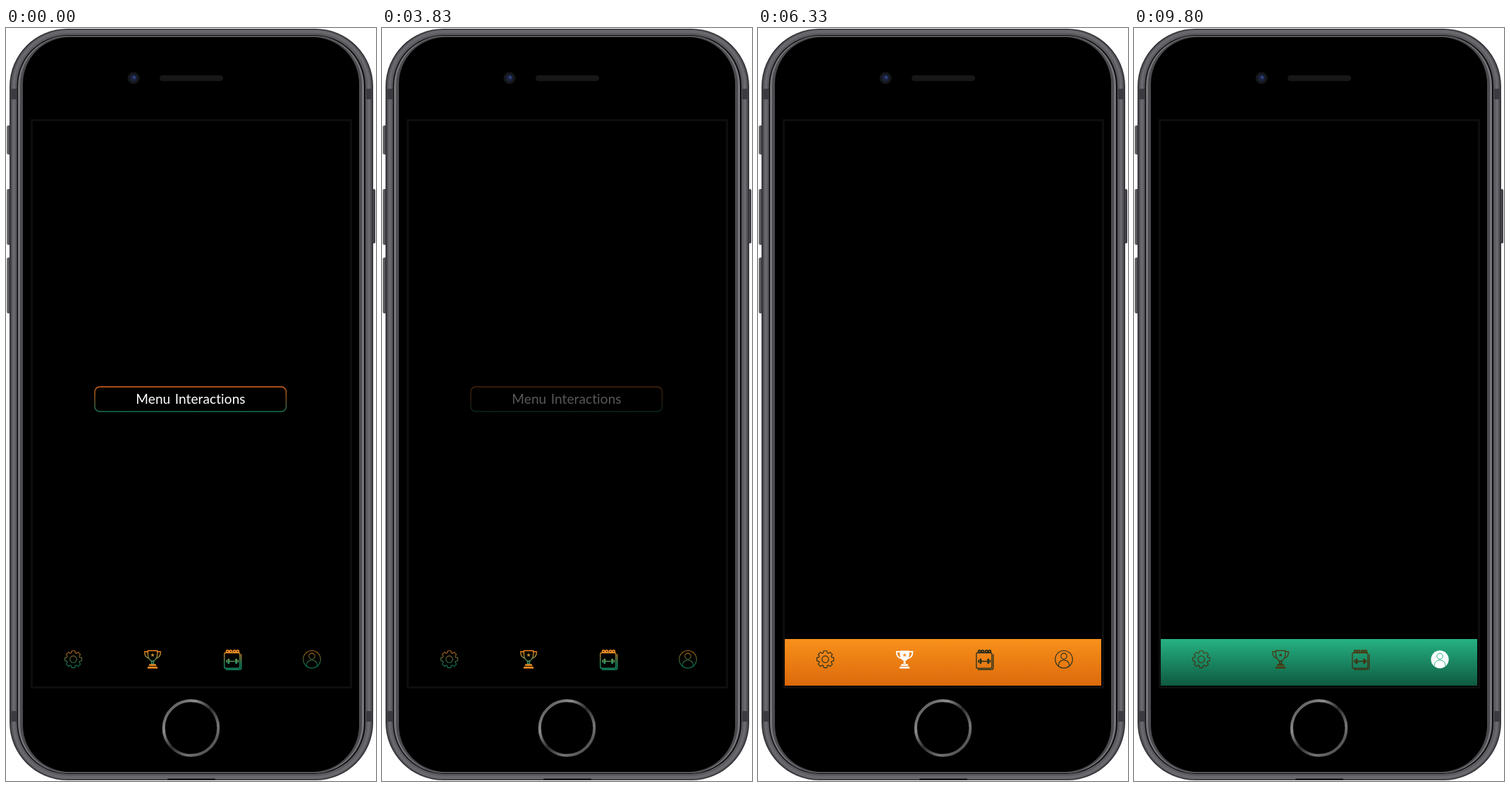
Write an HTML page that moves like this. It is 525 px wide and 1066 px high and loops after 9.83 s.

```html
<!DOCTYPE html>
<html lang="en">
<head>
<meta charset="utf-8">
<title>Menu Interactions</title>
<style>
  html, body { margin: 0; width: 100%; height: 100%; overflow: hidden; background: #fff; }
  svg { display: block; width: 100vw; height: 100vh; }
  text { font: 19px Lato, "Open Sans", sans-serif; letter-spacing: .1px; word-spacing: 1.5px; }
</style>
</head>
<body>
<svg viewBox="0 0 525 1066" xmlns="http://www.w3.org/2000/svg">
  <defs>
    <linearGradient id="button"><stop stop-color="#77777c"/><stop offset="1" stop-color="#2b2b31"/></linearGradient>
    <linearGradient id="home" x1="0" y1="0" x2="1" y2="1">
      <stop stop-color="#3c3c3c"/><stop offset=".28" stop-color="#8d8d8d"/><stop offset=".5" stop-color="#2a2a2a"/>
      <stop offset=".72" stop-color="#757575"/><stop offset="1" stop-color="#333"/>
    </linearGradient>
    <linearGradient id="edge" x1="0" y1="0" x2="0" y2="1">
      <stop stop-color="#dc641c"/><stop offset=".5" stop-color="#7a5527"/><stop offset="1" stop-color="#14714f"/>
    </linearGradient>
    <linearGradient id="bar" gradientUnits="userSpaceOnUse" x1="0" y1="865" x2="0" y2="931"><stop/><stop offset="1"/></linearGradient>
    <linearGradient id="wave" gradientUnits="userSpaceOnUse" x1="0" y1="865" x2="0" y2="931"><stop/><stop offset="1"/></linearGradient>
    <linearGradient id="ink" gradientUnits="userSpaceOnUse" x1="0" y1="881" x2="0" y2="907">
      <stop offset=".1"/><stop offset=".75"/>
    </linearGradient>
    <clipPath id="tray"><rect x="38" y="865" width="449" height="66"/></clipPath>
  </defs>
  <g id="phone"></g>
  <rect x="36.5" y="130.5" width="453" height="803" fill="none" stroke="#0e0e0e" stroke-width="3"/>
  <g id="title">
    <rect x="126" y="508" width="271.5" height="35" rx="7" fill="none" stroke="url(#edge)" stroke-width="1.5"/>
    <text x="262" y="531.5" text-anchor="middle" fill="#fff">Menu Interactions</text>
  </g>
  <g clip-path="url(#tray)">
    <rect id="fill" x="38" y="865" width="449" height="66" fill="url(#bar)"/>
    <path id="ripple" fill="url(#wave)"/>
  </g>
  <g id="icons"></g>
  <circle id="dot" r="24.5" fill="#808080" stroke="#8c8c8c" stroke-width=".7"/>
</svg>
<script>
const LOOP = 9830;
const $ = id => document.getElementById(id);
const clamp = v => Math.max(0, Math.min(1, v));
const span = (t, a, b) => clamp((t - a) / (b - a));
const mix = (a, b, p) => a + (b - a) * p;
const easeOut = p => 1 - (1 - p) ** 2;
const easeInOut = p => p < .5 ? 4 * p ** 3 : 1 - (2 - 2 * p) ** 3 / 2;
const rgb = hex => [1, 3, 5].map(i => parseInt(hex.substr(i, 2), 16));
const blend = (a, b, p) => {
  const to = rgb(b);
  return `rgb(${rgb(a).map((v, i) => Math.round(mix(v, to[i], p)))})`;
};
const set = (el, attrs) => { for (const k in attrs) el.setAttribute(k, attrs[k]); };
const paint = (id, colors) => [...$(id).children].forEach((s, i) => s.setAttribute('stop-color', colors[i]));
const rect = (x, y, w, h, rx, fill) =>
  `<rect x="${x}" y="${y}" width="${w}" height="${h}" rx="${rx}" fill="${fill}"/>`;
const circle = (x, y, r, extra = '') => `<circle cx="${x}" cy="${y}" r="${r}" ${extra}/>`;
const path = (d, extra = '') => `<path d="${d}" ${extra}/>`;

function drawPhone() {
  const bands = [86, 967].map(y => rect(5, y, 10, 15, 0, '#3b3b41') + rect(511, y, 10, 15, 0, '#3b3b41')).join('');
  const keys = [[1, 138, 41], [1, 228, 79], [1, 325, 79], [518, 228, 77]]
    .map(([x, y, h]) => rect(x, y, 6, h, 2, 'url(#button)')).join('');
  $('phone').innerHTML = keys +
    rect(5, 1, 516, 1064, 82, '#2f2f33') +
    rect(6.5, 2, 513, 1062, 81, '#505055') +
    rect(9, 3, 508, 1060, 79, '#68686d') +
    rect(13, 7, 500, 1052, 75, '#5a5a5f') + bands +
    rect(15.5, 10, 494.5, 1046, 72, '#0b0b0c') +
    rect(17, 11, 491, 1044, 71, '#77777b') +
    rect(20, 11.5, 485, 1043, 69, '#4b4b4f') +
    rect(24, 13, 477, 1040, 66, '#000') +
    rect(229, 1062.5, 68, 2.5, 1, '#17171a') +
    rect(218, 67, 90, 8, 4, '#171717') +
    circle(181, 71, 8.5, 'fill="#15161a"') + circle(181, 71, 5, 'fill="#1a2340"') +
    circle(182, 70, 2, 'fill="#2f4783"') +
    circle(262.5, 991, 38.8, 'fill="#000" stroke="url(#home)" stroke-width="4"');
}

// A cog outline with eight teeth.
function cog(cx, cy) {
  const points = [];
  for (let i = 0; i < 8; i++) {
    [[-.31, 9.4], [-.19, 12.2], [.19, 12.2], [.31, 9.4]].forEach(([d, r]) => {
      const a = i * Math.PI / 4 + d;
      points.push(`${(cx + r * Math.cos(a)).toFixed(2)} ${(cy + r * Math.sin(a)).toFixed(2)}`);
    });
  }
  return `M${points.join('L')}Z`;
}

function star(cx, cy, r) {
  const points = Array.from({ length: 10 }, (_, i) => {
    const a = i * Math.PI / 5 - Math.PI / 2, k = i % 2 ? r * .42 : r;
    return `${(cx + k * Math.cos(a)).toFixed(2)} ${(cy + k * Math.sin(a)).toFixed(2)}`;
  });
  return `M${points.join('L')}Z`;
}

const INK = 'stroke="url(#ink)" fill="none"';
const CUP = 'M201.3 881.5H214.7V886C214.7 892 211.5 895.5 208 896.5C204.5 895.5 201.3 892 201.3 886Z';
const HANDLES = 'M201.3 883H196.7C196.5 888 199 891.5 203.5 892.3M214.7 883H219.3C219.5 888 217 891.5 212.5 892.3';
const STEM = 'M206.5 896.5H209.5V900H206.5Z';
const BASE = 'M203.5 900.5H212.5L213.5 903H202.5ZM201.5 904H214.5L215.5 906.7H200.5Z';
const SHOULDERS = 'M426.3 903.2C426 897.5 429.5 895 434 895S442 897.5 441.7 903.2';
const GEAR = cog(95.5, 893.7);
const dumbbell = color =>
  `<g fill="${color}">${rect(317, 895.8, 8.5, 1.5, 0, color)}${rect(314.5, 892.8, 2.7, 7.5, 1, color)}` +
  `${rect(325.3, 892.8, 2.7, 7.5, 1, color)}${rect(312.3, 894.5, 1.7, 4, .7, color)}${rect(328.5, 894.5, 1.7, 4, .7, color)}</g>`;
const rings = [314.3, 318.7, 324.2, 328.6].map(x => circle(x, 882.6, 1.7)).join('');

const ICONS = [
  { x: 95.5,
    line: `<g ${INK} stroke-width="1.15" stroke-linejoin="round">${path(GEAR)}${circle(95.5, 893.7, 4.8)}</g>`,
    solid: path(GEAR, 'fill="#fff"') + circle(95.5, 893.7, 4.8, 'class="cut"') },
  { x: 208,
    line: `<g ${INK} stroke-width="1.3">${path(CUP)}${path(HANDLES)}${path(STEM)}</g>` +
      path(star(208, 887.8, 3.1), 'fill="url(#ink)"') + path(BASE, 'class="base"'),
    solid: `<g fill="#fff">${path(CUP)}${path(STEM)}${path(BASE)}</g>` +
      path(HANDLES, 'fill="none" stroke="#fff" stroke-width="1.8"') + path(star(208, 887.8, 3.1), 'class="cut"') },
  { x: 321,
    line: `<g ${INK} stroke-width="1.3"><rect x="309.8" y="884.5" width="22" height="22" rx="2"/>` +
      `${path('M333.8 886.5V906Q333.8 908.4 331.4 908.4H312')}<g stroke-width="1.9">${rings}</g></g>` +
      dumbbell('url(#ink)'),
    solid: rect(309.5, 884, 24, 24.5, 2, '#fff') +
      `<g fill="#fff" stroke="#4d6a5e" stroke-width=".9">${rings}</g>` +
      `<g opacity=".7">${dumbbell('#6d6d6d')}</g>` },
  { x: 434,
    line: `<g ${INK} stroke-width="1.15">${circle(434, 893.8, 12.3)}${circle(434, 889.3, 4.2)}${path(SHOULDERS)}</g>`,
    solid: circle(434, 893.8, 12.6, 'fill="#fff"') +
      `<g class="trace" fill="none" stroke-width="1">${circle(434, 889.3, 4.2)}${path(SHOULDERS)}</g>` }
];

// Each state: start and end of its reveal, bar colours, icon line colours.
const STATES = [
  { start: 0, end: 1, bar: ['#000000', '#000000'], ink: ['#ef8a20', '#189a70'] },
  { start: 3950, end: 4700, bar: ['#be3b10', '#b0350d'], ink: ['#201a14', '#201a14'] },
  { start: 5200, end: 5950, bar: ['#f8911b', '#dc690b'], ink: ['#2b2b1c', '#1f3022'] },
  { start: 6450, end: 7200, bar: ['#2dc492', '#27b07f'], ink: ['#4c2b12', '#2c2a14'] },
  { start: 7750, end: 8500, bar: ['#26b282', '#0e5a41'], ink: ['#4a3a14', '#3f2c10'] }
];

drawPhone();
$('icons').innerHTML = ICONS.map(({ line, solid }, i) =>
  `<g><g class="line" opacity="${i % 3 ? 1 : .72}">${line}</g><g class="solid">${solid}</g></g>`).join('');
const solids = document.querySelectorAll('.solid');
const lines = document.querySelectorAll('.line');
const cuts = document.querySelectorAll('.cut');
const trace = document.querySelector('.trace');
const base = document.querySelector('.base');

function drawBar(t) {
  let n = STATES.length - 1;
  while (t < STATES[n].start) n--;
  const now = STATES[n], before = STATES[Math.max(0, n - 1)];
  const u = n ? span(t, now.start, now.end) : 1;
  const p = easeInOut(u);

  const under = u < 1 ? before : now;
  paint('bar', under.bar);
  set($('fill'), { opacity: under === STATES[0] ? 0 : 1 });

  if (n && u < 1) {
    const x = mix(ICONS[n - 1].x, 262.5, p), half = mix(12, 226, p);
    const top = 865 + 16 * (1 - p) ** 5.5, ry = 12 + 460 * p;
    set($('ripple'), {
      d: `M${x - half} ${top}H${x + half}V${top + 5}A${half} ${ry} 0 0 1 ${x - half} ${top + 5}Z`,
      opacity: .45 + .55 * p, visibility: 'visible'
    });
    paint('wave', now.bar.map(c => blend('#605f30', c, p)));
  } else {
    set($('ripple'), { visibility: 'hidden' });
  }

  const ink = now.ink.map((c, i) => blend(before.ink[i], c, clamp(u * 2)));
  paint('ink', ink);
  set(base, { fill: ink[0] });
  const tone = blend(before.bar[0], now.bar[0], p);
  cuts.forEach(c => set(c, { fill: tone }));
  set(trace, { stroke: tone });
  solids.forEach((s, i) => {
    const white = i === n - 1 ? clamp(u * 1.4) : i === n - 2 ? clamp(1 - u * 3) : 0;
    const weight = i % 3 ? 1 : mix(.72, 1, n > 1 ? 1 : n ? u : 0);
    set(s, { opacity: white });
    set(lines[i], { opacity: (1 - white) * weight });
  });
}

function drawDot(t) {
  const peek = easeOut(span(t, 1400, 1670));
  const move = easeOut(span(t, 1830, 2800));
  const press = Math.sin(Math.PI * span(t, 2900, 3250));
  const x = mix(mix(564, 538, peek), 257, move), y = mix(884, 533, move);
  set($('dot'), { cx: x, cy: y, r: 24.5 - 5 * press, opacity: 1 - span(t, 3250, 3600) });
}

function draw(t) {
  set($('title'), { opacity: 1 - span(t, 3600, 3950) });
  drawDot(t);
  drawBar(t);
}

const begin = performance.now();
function tick() {
  draw((performance.now() - begin) % LOOP);
  requestAnimationFrame(tick);
}
tick();
</script>
</body>
</html>
```
